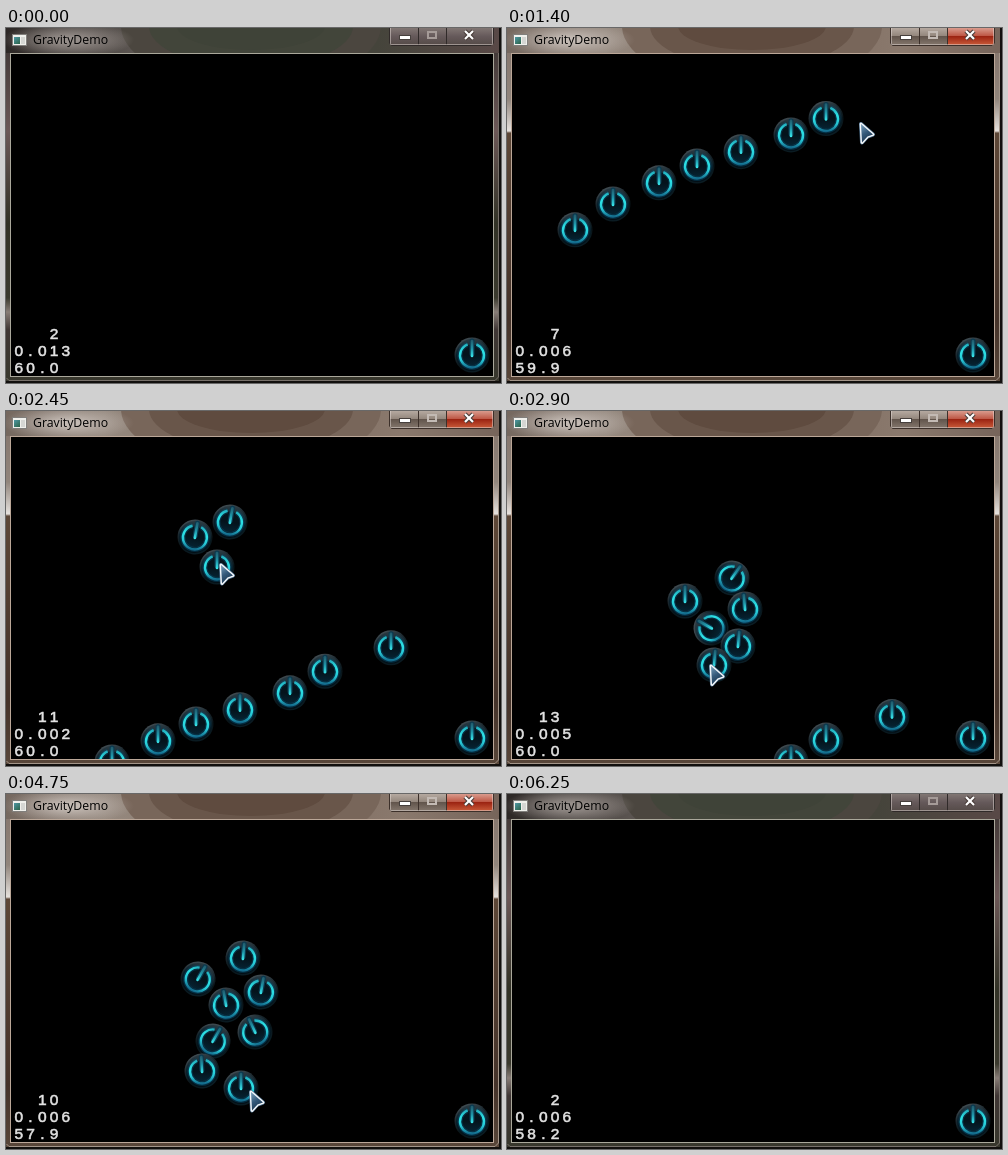
Recreate the animation shown at these times as an HTML page with a canvas. Size 495x355 px, loop 6450 ms.

```html
<!DOCTYPE html>
<html>
<head>
<meta charset="utf-8">
<title>GravityDemo</title>
<style>
html, body { margin: 0; width: 495px; height: 355px; overflow: hidden; background: #000; }
canvas { display: block; }
</style>
</head>
<body>
<canvas id="stage" width="495" height="355"></canvas>
<script>
const c = document.getElementById('stage').getContext('2d');
const LOOP = 6450, STEP = 50, ACTIVE_FROM = 350, ACTIVE_TO = 6150;
const GONE = 367, CENTRE = 212;

// Falling: a short run-up from rest, then a steady speed that eases off once
const runUp = s => s < 150 ? s * s / 300 : s - 75;
const drop = t => Math.min(t, 2375) / 6 + Math.max(0, t - 2375) * 0.153;
const fallen = (b, t) => drop(b.birth + runUp(t - b.birth));

// Dropped along a sweep to the right, at a steady pointer speed
const sweep = (x, y) => {
  const birth = 720 + (x - 68) * 2.5;
  return { birth, keys: [[birth, x, y, 0]], drift: 0, spin: 0 };
};

// Dropped on a pile that spreads from its centre; keys are [time, x, y, degrees]
const pile = (birth, ...keys) => {
  const off = keys[keys.length - 1][1] - CENTRE;
  return { birth, keys, drift: off * 0.00038, spin: -Math.abs(off) * 0.0023 };
};

const balls = [
  sweep(68, 101), sweep(106, 91), sweep(152, 89), sweep(190, 88),
  sweep(234, 92), sweep(284, 96), sweep(319, 89), sweep(385, 93),
  pile(2150, [2450, 189, 126, 10], [2900, 178, 190, 0]),
  pile(2250, [2450, 224, 111, 10], [2900, 225, 167, 35]),
  pile(2390, [2450, 211, 156, 0], [2900, 204, 217, -60]),
  pile(2550, [2900, 238, 198, -5]),
  pile(2650, [2900, 231, 235, 5]),
  pile(2850, [2900, 207, 254, 5]),
  pile(3650, [3850, 231, 57, 0], [4750, 255, 198, 10]),
  pile(3900, [4750, 192, 185, 30]),
  pile(4050, [4750, 237, 164, 5]),
  pile(4150, [4750, 220, 211, -10]),
  pile(4300, [4750, 207, 247, 30]),
  pile(4400, [4750, 249, 238, -25]),
  pile(4530, [4750, 196, 277, -3]),
  pile(4640, [4750, 235, 294, 0])
];

function between(keys, t) {
  const i = keys.findIndex(k => k[0] > t);
  const a = keys[i - 1], b = keys[i];
  const p = (t - a[0]) / (b[0] - a[0]);
  return a.slice(1).map((v, j) => v + (b[j + 1] - v) * p);
}

function pose(b, t) {
  const first = b.keys[0], last = b.keys[b.keys.length - 1];
  if (t > first[0] && t < last[0]) return between(b.keys, t);
  const [at, x, y, deg] = t <= first[0] ? first : last;
  const nextY = y + fallen(b, t) - fallen(b, at);
  if (t > at) return [x + b.drift * (t - at), nextY, deg + b.spin * (t - at)];
  return [x, nextY, deg * (t - b.birth) / (at - b.birth || 1)];
}

const visible = t => balls.filter(b => t >= b.birth).map(b => pose(b, t)).filter(p => p[1] < GONE);

// The pointer visits every place where a ball is born
const pointer = [
  ...balls.map(b => [b.birth, ...pose(b, b.birth)]),
  [550, 5, 125], [1400, 353, 95], [1750, 398, 98], [2450, 214, 153], [2900, 203, 254],
  [3850, 201, 70], [4750, 244, 297], [5200, 255, 292], [5850, 460, 290], [5950, 498, 300]
].sort((a, b) => a[0] - b[0]);

// [from, milliseconds per frame, frames per second]
const rates = [
  [0, 13, 60], [1150, 6, 59.9], [2150, 2, 60], [2650, 5, 60],
  [3650, 3, 55.8], [4650, 6, 57.9], [6150, 6, 58.2]
];

function gradient(x0, y0, x1, y1, ...colors) {
  const g = c.createLinearGradient(x0, y0, x1, y1);
  colors.forEach((v, i) => Array.isArray(v)
    ? g.addColorStop(...v)
    : g.addColorStop(i / (colors.length - 1), v));
  return g;
}

function rect(x, y, w, h, fill) {
  c.fillStyle = fill;
  c.fillRect(x, y, w, h);
}

function frame(x, y, w, h, color) {
  c.strokeStyle = color;
  c.lineWidth = 1;
  c.strokeRect(x + 0.5, y + 0.5, w - 1, h - 1);
}

function line(color, width, ...pts) {
  c.strokeStyle = color;
  c.lineWidth = width;
  c.beginPath();
  pts.forEach(p => c.lineTo(...p));
  c.stroke();
}

function glass(active) {
  rect(0, 0, 495, 355, active
    ? gradient(0, 0, 0, 355, [0, '#817168'], [0.2, '#91857c'], [0.29, '#e6e1dd'],
      [0.296, '#5d4737'], [0.82, '#45332a'], [1, '#59473a'])
    : gradient(0, 0, 0, 355, [0, '#383230'], [0.29, '#6c5857'], [0.55, '#323226'],
      [0.76, '#3b3a2e'], [0.8, '#887d77'], [0.85, '#403735'], [1, '#37372c']));
  rect(0, 0, 495, 25, active
    ? gradient(0, 0, 495, 0, '#75685f', '#95897f', '#8a796d', '#806e62', '#8a796d', '#76645a')
    : gradient(0, 0, 495, 0, '#2d2826', '#5a5450', '#47443d', '#45443b', '#594947'));
  c.save();
  c.beginPath();
  c.rect(0, 0, 495, 25);
  c.clip();
  const bands = active ? ['#78665a', '#69564a', '#5f4b3f'] : ['#4b463f', '#42453a', '#3f4338'];
  bands.forEach((color, i) => {
    c.fillStyle = color;
    c.beginPath();
    c.ellipse(245, -2, 130 - 28 * i, 60 - 18 * i, 0, 0, 7);
    c.fill();
  });
  c.translate(62, 12);
  c.scale(1, 0.27);
  const glow = c.createRadialGradient(0, 0, 10, 0, 0, 66);
  glow.addColorStop(0, active ? 'rgba(215,207,201,.75)' : 'rgba(185,177,172,.7)');
  glow.addColorStop(1, 'rgba(200,190,185,0)');
  rect(-66, -66, 132, 132, glow);
  c.restore();
  const rim = active ? '#a39589' : '#77706a';
  rect(493, 0, 2, 355, '#12100e');
  rect(0, 353, 495, 2, '#12100e');
  line(rim, 1, [492.5, 25], [492.5, 349], [489, 352.5], [3, 352.5], [0.5, 350]);
}

function buttons(active) {
  rect(384, 0, 103, 17, active
    ? gradient(0, 0, 0, 17, '#b5a9a0', [0.48, '#92857b'], [0.5, '#62554c'], '#83766c')
    : gradient(0, 0, 0, 17, '#817673', '#65595a', '#554b48'));
  if (active) rect(440, 0, 47, 17,
    gradient(0, 0, 0, 17, '#d99b8d', [0.47, '#bd5644'], [0.5, '#9c2412'], '#c95a39'));
  const edge = active ? '#3c302a' : '#302a29';
  line(edge, 1, [383.5, 0], [383.5, 15], [385.5, 17.5], [485, 17.5], [487.5, 15], [487.5, 0]);
  [412.5, 440.5].forEach(x => line(edge, 1, [x, 0], [x, 17]));
  line('rgba(230,220,215,.5)', 1, [384.5, 0], [384.5, 16.5], [486.5, 16.5], [486.5, 0]);
  rect(393, 7, 12, 5, '#46403d');
  rect(394, 8, 10, 3, '#fff');
  c.lineWidth = 2;
  c.strokeStyle = active ? '#c3bab4' : '#a59b98';
  c.strokeRect(422, 4, 8, 6);
  [['#493c38', 4.2], ['#fff', 2.2]].forEach(([color, w]) => {
    line(color, w, [459, 3], [467, 11]);
    line(color, w, [467, 3], [459, 11]);
  });
}

function titleBar(active) {
  rect(6, 6, 15, 12, '#f0f0ec');
  frame(6, 6, 15, 12, '#817f7c');
  rect(8, 9, 6, 7, gradient(8, 9, 14, 16, '#4f97a4', '#2b6448'));
  rect(15, 9, 4, 7, '#d5d6d3');
  c.fillStyle = '#000';
  c.font = '12.3px "Open Sans", "Noto Sans", sans-serif';
  c.textAlign = 'left';
  c.fillText('GravityDemo', 27, 16);
  buttons(active);
}

function disc(r, fill) {
  c.fillStyle = fill;
  c.beginPath();
  c.arc(0, 0, r, 0, 7);
  c.fill();
}

function ring(width, color) {
  c.lineWidth = width;
  c.strokeStyle = color;
  c.beginPath();
  c.arc(0, 0.5, 12, -1.2, Math.PI + 1.2);
  c.stroke();
}

function ball(x, y, deg) {
  c.save();
  c.translate(x, y);
  c.rotate(deg * Math.PI / 180);
  disc(17.5, gradient(-8, -17, 7, 17, '#444f55', '#1b282f', '#081418', '#0b1d25'));
  disc(16, gradient(0, -16, 0, 16, '#2a3a42', '#08202c', '#020d14'));
  disc(10.5, gradient(0, -11, 0, 11, '#07141c', '#04131c', '#062433'));
  ring(5, 'rgba(8,85,120,.4)');
  ring(2.4, gradient(0, -11, 0, 13, '#22aebd', '#2ce2e6', '#27c8d6', '#13688a'));
  c.lineCap = 'round';
  line('#0a3a50', 5, [0, -14], [0, -1]);
  line(gradient(0, -15, 0, 2, '#225a6b', '#1f93a6', '#38e8ec'), 2.6, [0, -14], [0, 1]);
  c.restore();
}

function readout(t) {
  const since = Math.max(0, Math.floor((t - 150) / 500) * 500 + 150);
  const [, ms, fps] = rates.filter(r => r[0] <= since).pop();
  const rows = [2 + visible(since).length, (ms / 1000).toFixed(3), fps.toFixed(1)];
  c.font = '15.5px "Liberation Sans", Arial, sans-serif';
  c.textAlign = 'center';
  c.fillStyle = c.strokeStyle = '#e2e2e2';
  c.lineWidth = 0.6;
  rows.forEach((value, row) => {
    [...String(value).padStart(4)].forEach((ch, i) => {
      c.fillText(ch, 12.7 + 11.8 * i, 311 + 17 * row);
      c.strokeText(ch, 12.7 + 11.8 * i, 311 + 17 * row);
    });
  });
}

function cursor(x, y) {
  c.save();
  c.translate(x, y);
  c.lineJoin = 'round';
  c.beginPath();
  [[1, 1], [13, 11.5], [7.5, 13.5], [2, 19.5]].forEach(p => c.lineTo(...p));
  c.closePath();
  [['#4f7392', 4], ['#f5f8fb', 2.8]].forEach(([color, width]) => {
    c.strokeStyle = color;
    c.lineWidth = width;
    c.stroke();
  });
  c.fillStyle = gradient(1, 3, 10, 17, '#7197b4', '#34597a', '#1c3852');
  c.fill();
  c.restore();
}

function draw(t) {
  const active = t >= ACTIVE_FROM && t < ACTIVE_TO;
  glass(active);
  titleBar(active);
  rect(5, 26, 483, 322, '#000');
  frame(4, 25, 484, 324, active ? '#bba798' : '#aaa89b');
  c.save();
  c.beginPath();
  c.rect(5, 26, 482, 322);
  c.clip();
  ball(466, 327, 0);
  visible(t).forEach(p => ball(...p));
  readout(t);
  c.restore();
  if (t >= pointer[0][0] && t < pointer[pointer.length - 1][0]) cursor(...between(pointer, t));
}

const begin = performance.now();
function tick() {
  const t = (performance.now() - begin) % LOOP;
  draw(Math.floor(t / STEP) * STEP);
  requestAnimationFrame(tick);
}
tick();
</script>
</body>
</html>
```
